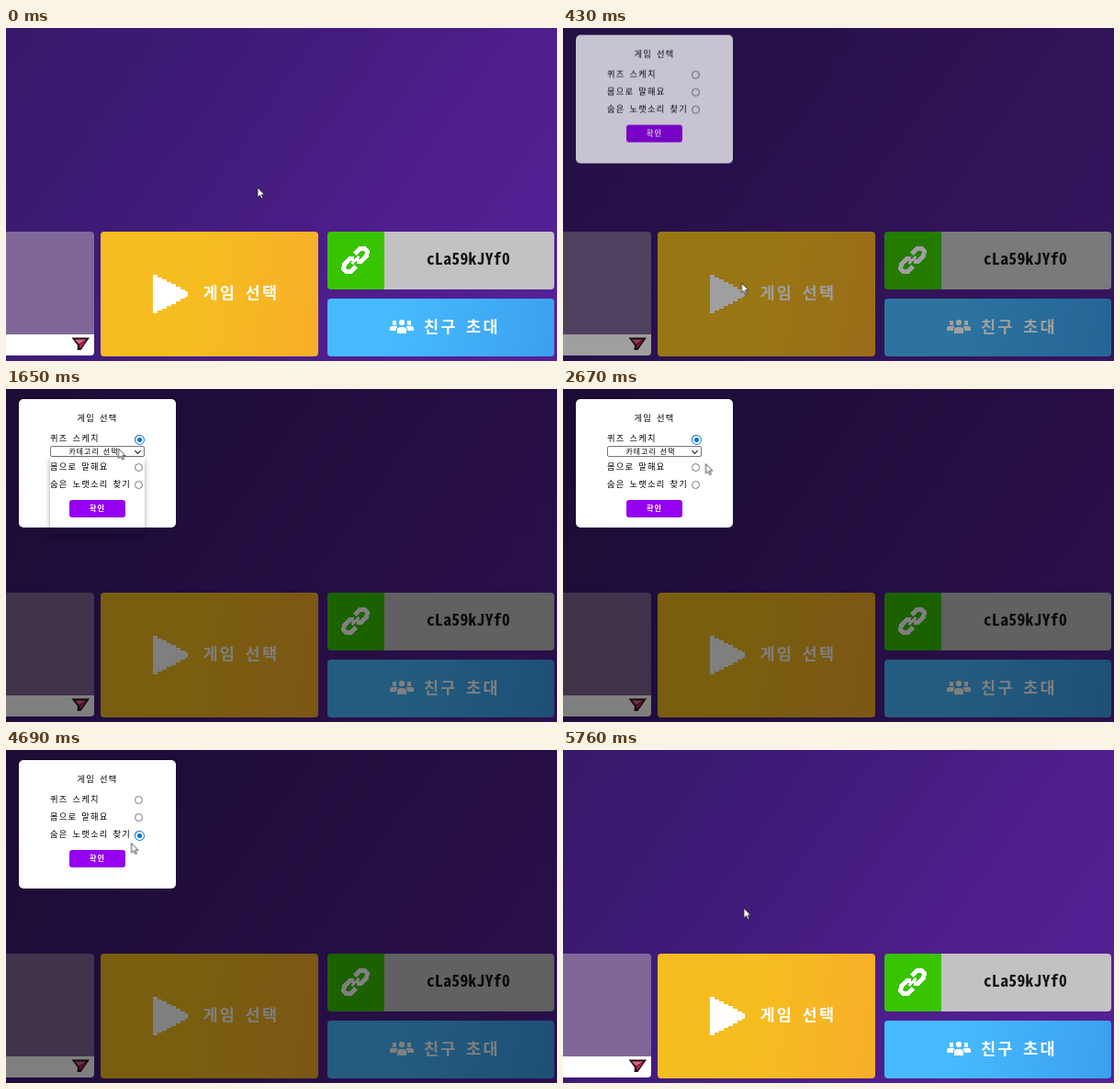
These frames come from a looping animation (600 by 363 pixels, 5860 ms). An HTML page:

```html
<!DOCTYPE html>
<html lang="ko">
<head>
<meta charset="utf-8">
<title>게임 선택</title>
<style>
* { box-sizing: border-box; }
html, body { margin: 0; width: 100%; height: 100%; overflow: hidden; }
body {
  position: relative;
  background: linear-gradient(125deg, #37196b, #401b79 35%, #4e1e8c 65%, #562197);
  font: 700 17.5px/1 "Noto Sans Mono CJK KR", "Noto Sans CJK KR", "DejaVu Sans Mono", monospace;
  white-space: nowrap;
}
body > *, .modal > h1, .radio, .list, .text { position: absolute; }
.text, h1, .row, .select, .ok { letter-spacing: .13em; word-spacing: -.1em; }

/* Lobby */
.card { border-radius: 4px; overflow: hidden; }
.chat { left: -10px; top: 222px; width: 106px; height: 135px; background: linear-gradient(#7f6899 112px, #fff 0); }
.play { left: 102.5px; top: 222px; width: 237px; height: 136px; background: linear-gradient(100deg, #f5bd20 45%, #f8ae29); }
.room { left: 350px; top: 222px; width: 247px; height: 63px; background: linear-gradient(90deg, #39c400 62px, #c4c1c5 0); }
.invite { left: 350px; top: 295px; width: 247px; height: 63px; background: linear-gradient(100deg, #47baff 30%, #3ba0ee); }
.icons { left: 0; top: 0; }
.text { color: #fff; line-height: 24px; }
.room .text { color: #111; letter-spacing: .02em; }

/* Dialog */
.shade { inset: 0; background: #000; opacity: 0; animation: fade 5860ms infinite; }
.modal {
  left: 14px; top: 11px; width: 171px; height: 140px; padding: 34.5px 34px 0;
  background: #fff; border-radius: 5px; color: #000; font-size: 9.3px; font-weight: 500;
  animation: drop 5860ms infinite;
}
.modal h1 { left: 0; top: 11px; width: 100%; margin: 0; font: inherit; line-height: 18px; text-align: center; }
.row { position: relative; height: 17px; line-height: 15px; }
.radio { left: 92px; top: 4.5px; width: 9px; height: 9px; border: 1px solid #777; border-radius: 50%; }
.dot { position: absolute; left: -1px; top: -1px; }
.dot::after {
  content: ""; position: absolute; left: 0; top: 0; width: 9px; height: 9px; border-radius: 50%;
  border: 1px solid #0875e1; background: radial-gradient(#0875e1 2.2px, #fff 2.8px);
}
.slot { position: relative; height: 2px; }
.select {
  position: absolute; left: 0; top: -.5px; width: 103px; height: 12px;
  border: 1px solid #767676; border-radius: 2px; background: #fff;
  font-size: 7.9px; line-height: 9px; text-align: center; padding-right: 8px;
}
.select::after {
  content: ""; position: absolute; right: 4px; top: 2px; width: 4px; height: 4px;
  border: solid #111; border-width: 0 1.4px 1.4px 0; transform: rotate(45deg);
}
.list { left: 0; top: 12px; width: 103px; height: 83px; box-shadow: 0 2px 6px rgba(0, 0, 0, .35); }
.ok {
  width: 61px; height: 19.5px; margin: 8px 0 0 21px; border-radius: 3px;
  background: #9500f0; color: #fff; font-size: 8.1px; font-weight: 700; line-height: 18px; text-align: center;
}
.pick1 { animation: pick1 5860ms step-end infinite; }
.pick2 { animation: pick2 5860ms step-end infinite; }
.pick3 { animation: pick3 5860ms step-end infinite; }
.list1 { animation: list1 5860ms step-end infinite; }
.list2 { animation: list2 5860ms step-end infinite; }
.focus { animation: focus 5860ms step-end infinite; }
.cursor { left: -1px; top: -2.5px; animation: travel 5860ms ease-in-out infinite; }

@keyframes fade {
  0%, 5.03% { opacity: 0; animation-timing-function: ease; }
  10.15% { opacity: .5; animation-timing-function: step-end; }
  97.44%, 100% { opacity: 0; }
}
@keyframes drop {
  0%, 5.03% { opacity: 0; transform: translateY(-14px); animation-timing-function: ease; }
  10.15% { opacity: 1; transform: translateY(0); animation-timing-function: step-end; }
  97.44%, 100% { opacity: 0; transform: translateY(-14px); }
}
/* A chosen row shows its dot and makes room for its select box */
@keyframes pick1 {
  0%, 49.3%, 100% { visibility: hidden; height: 2px; }
  19.6% { visibility: visible; height: 14px; }
}
@keyframes pick2 {
  0%, 70%, 100% { visibility: hidden; height: 2px; }
  49.3% { visibility: visible; height: 14px; }
}
@keyframes pick3 {
  0%, 97.44%, 100% { visibility: hidden; }
  70% { visibility: visible; }
}
@keyframes list1 {
  0%, 38.4%, 100% { opacity: 0; }
  27.6% { opacity: 1; }
}
@keyframes list2 {
  0%, 63%, 100% { opacity: 0; }
  56.3% { opacity: 1; }
}
@keyframes focus {
  0%, 70%, 100% { box-shadow: none; border-color: #767676; }
  63% { box-shadow: 0 0 0 .8px #111; border-color: #111; }
}
@keyframes travel {
  0%, .85% { transform: translate(274px, 175px); }
  5.1%, 10.1% { transform: translate(194.5px, 279px); }
  18.8%, 21% { transform: translate(145px, 52px); }
  25.6%, 31.9% { transform: translate(122.5px, 66px); }
  38.4% { transform: translate(124px, 72px); }
  45.5%, 46% { transform: translate(155.5px, 82.5px); }
  48.6%, 51.2% { transform: translate(146px, 84px); }
  55.5%, 61.4% { transform: translate(130px, 86px); }
  64.6%, 65.2% { transform: translate(139.5px, 95px); }
  69.1%, 78.3% { transform: translate(145px, 100px); }
  82.8% { transform: translate(118px, 108px); }
  88.2% { transform: translate(193px, 104px); }
  92.2%, 100% { transform: translate(197px, 173.5px); }
}
</style>
</head>
<body>
<div class="card chat"></div>
<div class="card play"><span class="text" style="left:112px;top:54px">게임 선택</span></div>
<div class="card room"><span class="text" style="left:108px;top:17px">cLa59kJYf0</span></div>
<div class="card invite"><span class="text" style="left:105px;top:18px">친구 초대</span></div>

<svg class="icons" width="600" height="363" fill="#fff" shape-rendering="crispEdges">
  <path d="M160 269h5v2.6h5v2.6h5v2.6h5v2.6h5v2.6h5v2.6h5v2.6h3v5.6h-3v2.6h-5v2.6h-5v2.6h-5v2.6h-5v2.6h-5v2.6h-5v2.6h-5z"/>
  <g transform="translate(380.5 253) rotate(-45)" fill="none" stroke="#fff" stroke-width="5">
    <path d="M-4 5.200h-8l-4-3v-4.400l4-3h9l3 3"/>
    <path d="M4 -5.200h8l4 3v4.400l-4 3h-9l-3-3"/>
    <path d="M-6 0h12" stroke-width="3"/>
  </g>
  <path d="M421 319h4v5h-4zM437 319h4v5h-4zM429 318h4v1h1v4h-1v1h-4v-1h-1v-4h1z"/>
  <path d="M419 325h7v2h-1v3h-7v-4h1zM436 325h7v1h1v4h-7v-3h-1zM428 326h6v1h2v6h-10v-6h2z"/>
  <g shape-rendering="auto">
    <path d="M71.500 337.500H91L81.500 351H77.500L78 346Z" fill="#241018"/>
    <path d="M75 340H88L80.500 349.500L80 345Z" fill="#c8245e"/>
    <path d="M75 339.500H87.500L80 344.500Z" fill="#d9687a"/>
    <path d="M88 339.500L80 345" stroke="#4a1028"/>
  </g>
</svg>

<div class="shade"></div>
<div class="modal">
  <h1>게임 선택</h1>
  <div class="row">퀴즈 스케치<i class="radio"><i class="dot pick1"></i></i></div>
  <div class="slot pick1"><div class="select">카테고리 선택</div><div class="list list1"></div></div>
  <div class="row">몸으로 말해요<i class="radio"><i class="dot pick2"></i></i></div>
  <div class="slot pick2"><div class="select focus">카테고리 선택</div><div class="list list2"></div></div>
  <div class="row">숨은 노랫소리 찾기<i class="radio"><i class="dot pick3"></i></i></div>
  <div class="ok">확인</div>
</div>

<svg class="cursor" width="10" height="15" viewBox="-1 -1 10 15">
  <path d="M0 0V10.500L2.500 8.300 4.200 12 5.800 11.300 4.200 7.700H7.500Z" fill="#fff" stroke="#222" stroke-width=".8"/>
</svg>
</body>
</html>
```
